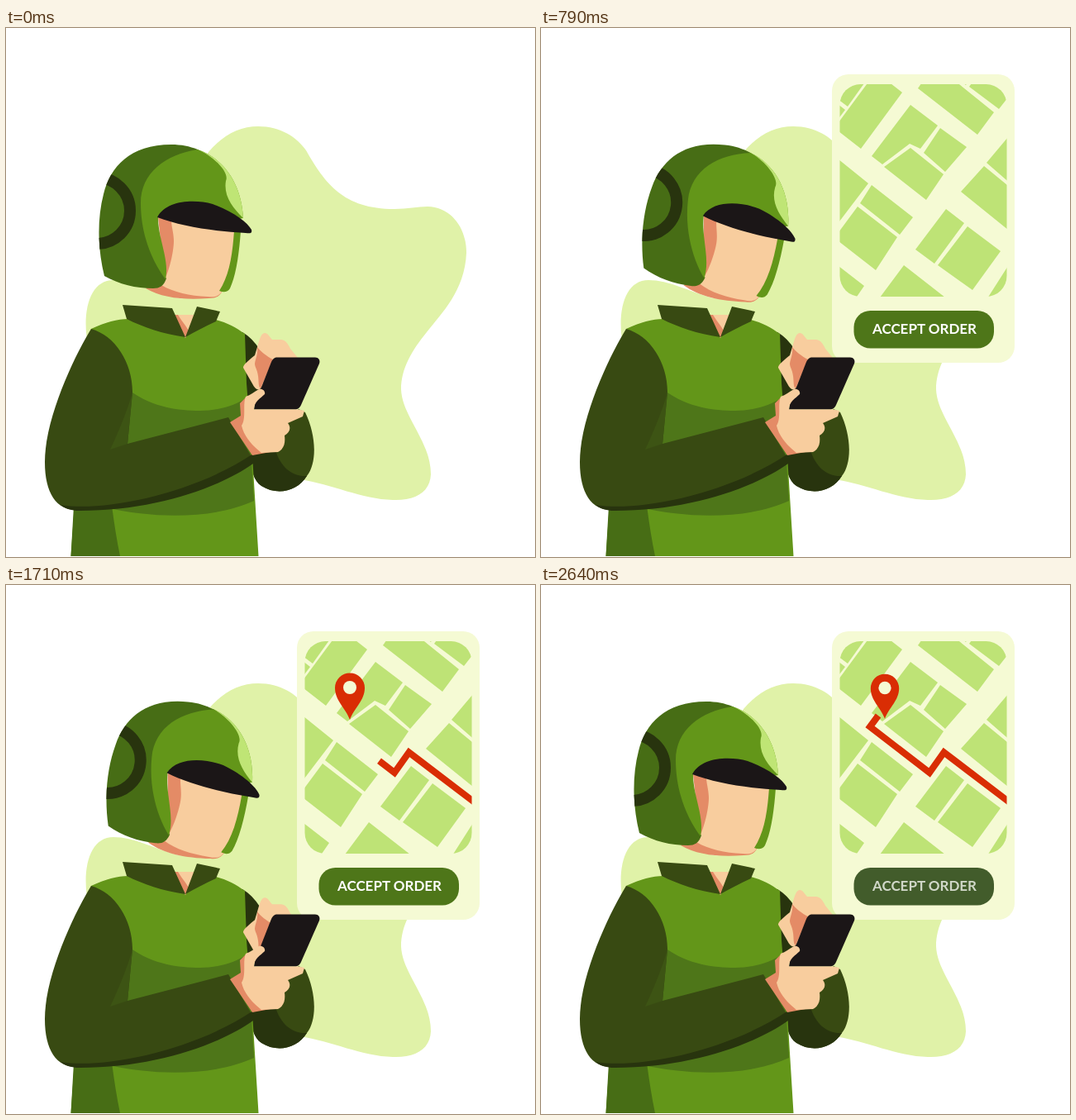
An HTML page that plays this animation: 640x640 px, repeating every 2710 ms.

```html
<!DOCTYPE html>
<html lang="en">
<head>
<meta charset="utf-8">
<title>Accept order</title>
<style>
  html, body { margin: 0; width: 100%; height: 100%; overflow: hidden; background: #fff; }
  svg { display: block; width: 100%; height: 100%; }
  .blob { fill: #e0f2a8; }
  .leaf { fill: #639619; }
  .moss { fill: #476d15; }
  .band { fill: #4e7619; }
  .sleeve { fill: #384a12; }
  .deep { fill: #28340e; }
  .skin { fill: #f8cd9e; }
  .blush { fill: #e48b66; }
  .ink { fill: #1b1617; }
  .paper { fill: #f5fad4; }
  .block { fill: #bee376; }
  .red { fill: #d92d04; }
  .label { font: 700 17px Lato, "Open Sans", sans-serif; text-anchor: middle; }
</style>
</head>
<body>
<svg viewBox="0 0 640 640">
  <defs>
    <clipPath id="mapClip"><rect x="361.5" y="68" width="202" height="257" rx="25"/></clipPath>
    <clipPath id="shellClip"><path id="shell" d="M119 300C111 268 110 232 118 201C126 168 150 141 200 141C212 141 222 143 232 147L236 150C195 156 166 177 166 212C166 250 179 281 194 303C191 312 186 315 178 315C157 315 137 310 119 300Z"/></clipPath>
  </defs>

  <path class="blob" d="M305 119C332 119 352 132 363 148C386 188 408 219 470 219C486 219 498 216 510 216C540 217 557 243 557 272C555 318 527 345 509 368C491 390 478 412 478 437C479 470 514 500 514 540C513 562 495 572 468 571C430 570 395 552 355 546L110 420C88 370 92 305 130 305C155 305 180 319 205 326C222 331 235 320 235 300C235 250 220 185 245 150C263 129 283 119 305 119Z"/>

  <g id="card">
    <rect class="paper" x="352" y="56" width="221" height="349" rx="20"/>
    <g clip-path="url(#mapClip)">
      <path class="block" d="M355 60H396L371 95L355 83ZM355 89L368 99L355 116ZM400 60H414L437 78L387 146L355 121Z
        M456 73L465 60H496L548 102L528 129ZM502 60H520L514 69ZM526 60H575V71L554 98L518 71Z
        M447 93L480 118L459 146L446 140L413 165L400 155ZM483 121L515 144L489 174L463 151Z
        M447 145L487 177L466 208L415 168Z
        M355 155L396 188L355 242ZM400 190L450 229L434 250L386 212ZM383 216L431 253L405 293L355 254Z
        M490 219L512 236L476 285L453 268ZM516 240L556 270L522 317L480 287Z
        M439 287L489 326H410ZM355 284L391 312L380 328H355ZM570 280V335H535Z
        M570 126V190L539 163ZM536 167L570 195V248L508 198Z"/>
      <path id="route" pathLength="1" fill="none" stroke="#d92d04" stroke-width="8" d="M567 263L487.500 202.500L470 227L398 171.500L408 158"/>
    </g>
    <g id="pin">
      <path class="red" d="M416 163C411 149 398 140 398 124.500A18 18 0 0 1 434 124.500C434 140 421 149 416 163Z"/>
      <circle class="paper" cx="416" cy="124" r="8"/>
    </g>
    <rect id="button" x="378.500" y="342" width="169.500" height="45.500" rx="20"/>
    <text id="label" class="label" x="464" y="370">ACCEPT ORDER</text>
  </g>

  <!-- far arm -->
  <path class="deep" d="M286 368L289 370C297 375 304 384 309 392L312 440L286 450Z"/>
  <path class="sleeve" d="M354 461L362 465C375 492 377 525 364 542C352 561 328 566 309 554C299 547 297 535 296 517Z"/>
  <path class="deep" d="M296 517L326 511C332 530 345 543 364 542C352 561 328 566 309 554C299 547 297 535 296 517Z"/>

  <!-- torso -->
  <path class="leaf" d="M103 364C120 356 135 352 148 352H250C265 355 278 362 289 370L291 430L298 517L305.500 639H78.500L84 560Z"/>
  <path class="band" d="M150 439C178 459 208 463 235 463C258 463 278 456 292 447L300 572C255 593 185 595 120 580Z"/>
  <path class="moss" d="M82 578H128C131 600 134 620 138 639H78.500Z"/>

  <!-- neck and collar -->
  <path class="skin" d="M203 347H231L217 375Z"/>
  <path class="blush" d="M203 347H208C213 355 216 358 221 366L217 375Z"/>
  <path class="sleeve" d="M141 335L201 339L217 374C189 370 166 362 146 352ZM231 337L259 343L254 355C241 361 229 367 217 374Z"/>

  <!-- head -->
  <g id="head">
    <path class="blush" d="M184 229L205 235L262 318C258 325 254 327 246 327C215 329 190 327 169 315L192 304Z"/>
    <path class="skin" d="M200 233L278 245C276 275 271 300 261 319C257 325 252 326 244 325C222 324 203 320 188 311C197 299 203 270 203 258C203 248 200 240 200 233Z"/>
    <path class="leaf" d="M276 245H284C282 275 278 300 271 315C268 320 263 320 258 318C270 300 274 275 276 245Z"/>
    <use href="#shell" class="moss"/>
    <g clip-path="url(#shellClip)">
      <circle cx="110" cy="221" r="40" fill="none" stroke="#28340e" stroke-width="14"/>
    </g>
    <path class="leaf" d="M232 147C262 157 285 187 287 230L260 235L184 229C184 256 198 280 193 304C177 283 163 250 163 212C163 175 193 153 232 147Z"/>
    <path fill="#bfe575" d="M232 147C262 157 285 187 287 230C274 217 263 203 266 185C271 174 249 154 232 147Z"/>
    <path class="ink" d="M183 229C194 208 228 207 250 213C275 222 292 235 297 244C298 248 296 249 290 248C252 246 212 240 183 229Z"/>
  </g>

  <!-- tapping hand -->
  <g id="tap">
    <path class="skin" d="M313 369C317 369 319 374 322 377L333 377C339 378 341 382 344 388L353 399L330 405L308 436C304 440 300 434 299 432L287 411C287 408 290 405 301 396L304 386C306 380 308 369 313 369Z"/>
    <path class="blush" d="M304 386C308 391 315 397 323 401L308 436C305 434 306 428 305 421C304 413 301 410 301 406C302 399 305 395 304 386Z"/>
  </g>

  <!-- phone -->
  <path class="ink" d="M328 398.500H374C378 398.500 380.500 402 379 406L357 456C355 460 353 461.500 349 461.500H300L301 455L321 404C323 400 325 398.500 328 398.500Z"/>

  <!-- near arm -->
  <path class="sleeve" d="M103 364C85 393 47 470 47 525C47 563 61 583 85 583C165 585 260 553 299 522L269 471L147 503L153 440C153 405 132 372 103 364Z"/>
  <path fill="#3d5414" d="M153 441L147 503L126 510C137 486 146 465 153 441Z"/>
  <path class="deep" d="M66 577C120 586 230 562 299 515V527C255 558 175 585 85 584C77 583 71 581 66 577Z"/>

  <!-- holding hand -->
  <path class="blush" d="M271 477L284 469L283 454L292 445L320 513L298 517Z"/>
  <path class="skin" d="M290 446C296 444 300 440 306 437C311 436 314 440 313 443C308 448 300 452 300 461.500H354L361 463L359 470L341 478C345 483 344 489 337 493C338 501 337 509 329 513L309 514C299 506 288 495 285 481C291 472 286 455 290 446Z"/>
</svg>
<script>
  const FPS = 14, LOOP = 2710;
  const el = id => document.getElementById(id);
  const [card, route, pin, button, label, head, tap] =
    ["card", "route", "pin", "button", "label", "head", "tap"].map(el);

  const ramp = (x, a, b) => Math.min(1, Math.max(0, (x - a) / (b - a)));
  // up from a to b, back down from b to c
  const peak = (x, a, b, c) => x < b ? ramp(x, a, b) : 1 - ramp(x, b, c);
  const mix = (from, to, k) =>
    `rgb(${from.map((v, i) => Math.round(v + (to[i] - v) * k)).join()})`;
  const scaleAt = (x, y, s) => `translate(${x} ${y}) scale(${s}) translate(${-x} ${-y})`;
  const show = (node, on) => { node.style.display = on ? "" : "none"; };

  function pinScale(n) {
    if (n < 25) return 1.02 * Math.sin(ramp(n, 17, 25) * Math.PI / 2);
    return 0.74 + 0.28 * Math.cos((n - 25) / 13.5 * 2 * Math.PI);
  }

  function draw(n) {
    head.setAttribute("transform", `rotate(${9.3 * peak(n, 0, 16, 37)} 206 343)`);

    const press = peak(n, 0, 5, 10) + peak(n, 22, 27, 32);
    tap.setAttribute("transform", `translate(0 ${23 * press})`);

    const grow = ramp(n, 7, 11);
    show(card, grow > 0);
    card.setAttribute("transform", scaleAt(336, 430, grow));

    const drawn = ramp(n, 18, 27.3);
    show(route, drawn > 0);
    route.setAttribute("stroke-dasharray", `${drawn} 2`);

    const size = pinScale(n);
    show(pin, size > 0);
    pin.setAttribute("transform", scaleAt(416, 135, size));

    const dim = ramp(n, 26, 31);
    button.setAttribute("fill", mix([78, 118, 25], [66, 92, 43], dim));
    label.setAttribute("fill", mix([255, 255, 255], [208, 215, 200], dim));
  }

  function tick() {
    const t = performance.now() % LOOP;
    draw(Math.min(37, Math.floor((t + 5) * FPS / 1000)));
    requestAnimationFrame(tick);
  }
  tick();
</script>
</body>
</html>
```
